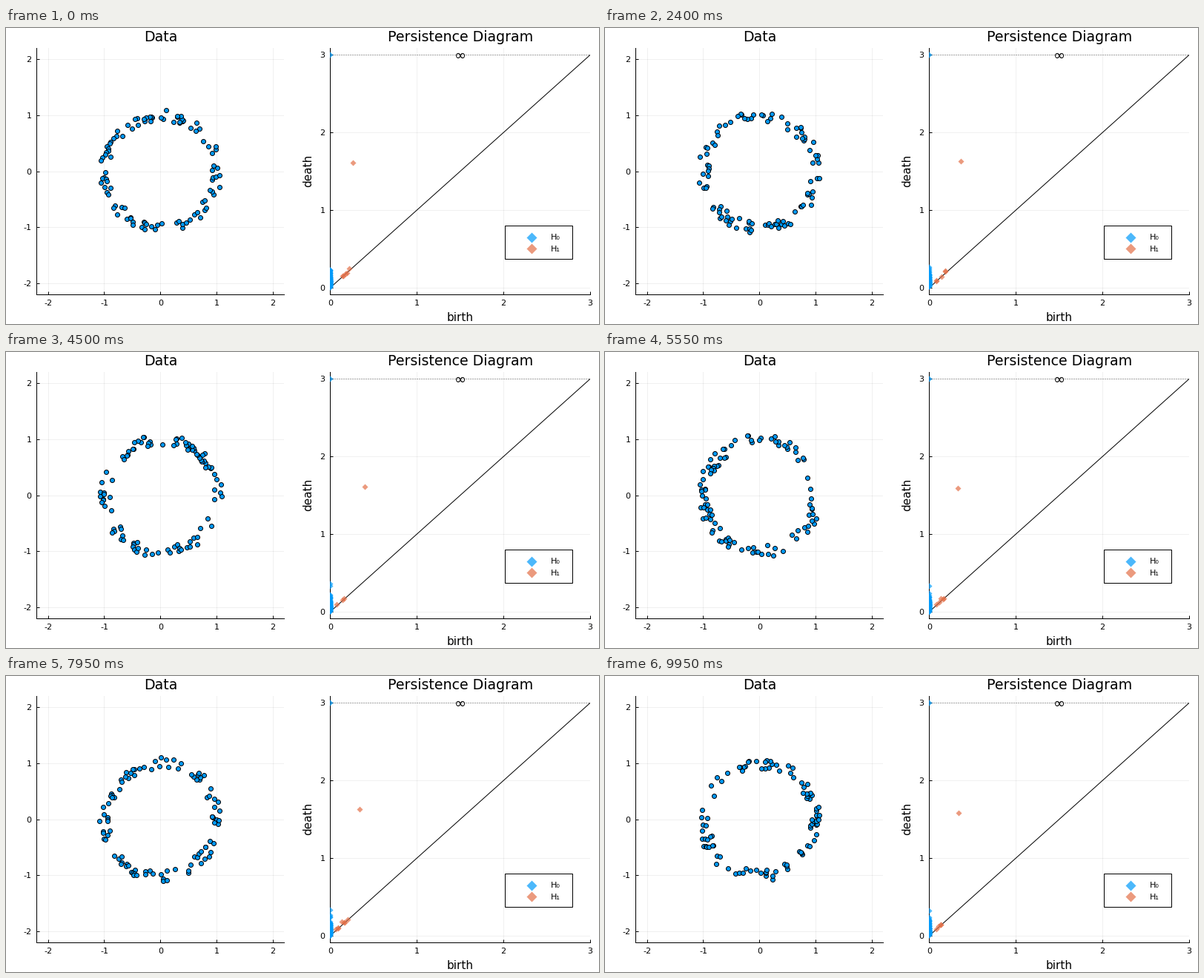
Recreate the animation shown at these times as a matplotlib script. Size 800 by 400 pixels, loop 10 s.

```python
import itertools

import matplotlib.pyplot as plt
import numpy as np
from matplotlib.animation import FuncAnimation
from matplotlib.patches import Rectangle

W, H, DPI = 800, 400, 100
PX = 72 / DPI                      # one pixel in points
FRAMES, INTERVAL = 200, 50
N = 100                            # points per sample
R_MIN, R_MAX = 0.9, 1.1
SMALL = 0.35                       # longest edge considered for minor loops
BLUE, ORANGE = "#009afa", "#e36f47"

plt.rcParams["font.family"] = "DejaVu Sans"

# Index tables shared by every sample
PAIRS = np.array(list(itertools.combinations(range(N), 2)))
PAIR_ID = np.zeros((N, N), int)
PAIR_ID[PAIRS[:, 0], PAIRS[:, 1]] = np.arange(len(PAIRS))
I, J, K = np.array(list(itertools.combinations(range(N), 3))).T
SIDES = np.array([PAIR_ID[I, J], PAIR_ID[I, K], PAIR_ID[J, K]])


def sample(frame):
    """Noisy ring, sorted by angle."""
    rng = np.random.default_rng(1000 + frame)
    theta = np.sort(rng.uniform(0, 2 * np.pi, N))
    radius = rng.uniform(R_MIN, R_MAX, N)
    xy = np.column_stack([radius * np.cos(theta), radius * np.sin(theta)])
    return theta, xy


def merge_components(theta, length, order):
    """Component deaths, and the length at which a cycle first circles the ring."""
    label, turn = np.arange(N), np.zeros(N)
    deaths, birth = [], None
    for e in order:
        i, j = PAIRS[e]
        step = (theta[j] - theta[i] + np.pi) % (2 * np.pi) - np.pi
        gap = turn[i] + step - turn[j]
        if label[i] != label[j]:
            moved = label == label[j]
            turn[moved] += gap
            label[moved] = label[i]
            deaths.append(length[e])
        elif birth is None and abs(gap) > 1:
            birth = length[e]
        if birth is not None and len(deaths) == N - 1:
            break
    return deaths, birth


def minor_loops(ranks, top, sorted_length):
    """Short-lived loops, by reducing the boundary matrix modulo 2."""
    short = np.flatnonzero(top < np.searchsorted(sorted_length, SMALL))
    short = short[np.argsort(top[short], kind="stable")]
    columns, loops = {}, []
    for t in short:
        col = 0
        for r in ranks[:, t]:
            col ^= 1 << int(r)
        while col:
            low = col.bit_length() - 1
            if low not in columns:
                columns[low] = col
                if low != top[t]:
                    loops.append((sorted_length[low], sorted_length[top[t]]))
                break
            col ^= columns[low]
    return loops


def persistence(theta, xy):
    length = np.hypot(*(xy[PAIRS[:, 0]] - xy[PAIRS[:, 1]]).T)
    order = np.argsort(length)
    rank = np.empty(len(order), int)
    rank[order] = np.arange(len(order))
    ranks = rank[SIDES]
    top = ranks.max(axis=0)
    sorted_length = length[order]

    deaths, birth = merge_components(theta, length, order)
    # The ring closes with the first triangle around its centre
    around = ((theta[J] - theta[I] < np.pi) & (theta[K] - theta[J] < np.pi)
              & (theta[K] - theta[I] > np.pi))
    ring = (birth, sorted_length[top[around].min()])
    h0 = np.array([(0, d) for d in deaths] + [(0, 3)])
    h1 = np.array(minor_loops(ranks, top, sorted_length) + [ring])
    return h0, h1


fig = plt.figure(figsize=(W / DPI, H / DPI), dpi=DPI, facecolor="white")


def text(x, y, s, px, **kw):
    kw.setdefault("ha", "center")
    fig.text(x / W, 1 - y / H, s, fontsize=px * PX, va="baseline",
             rotation_mode="anchor", **kw)


def panel(left, right, xlim, ylim, xticks, yticks, title):
    top, bottom = 27, 360.4
    ax = fig.add_axes([left / W, 1 - bottom / H, (right - left) / W, (bottom - top) / H])
    ax.set(xlim=xlim, ylim=ylim, xticks=xticks, yticks=yticks)
    ax.set_axisbelow(True)
    ax.patch.set_visible(False)
    ax.grid(color="black", alpha=0.06, lw=PX)
    ax.tick_params(direction="in", length=4 * PX, width=PX,
                   labelbottom=False, labelleft=False)
    for side in ("left", "bottom"):
        ax.spines[side].set_linewidth(PX)
    for side in ("top", "right"):
        ax.spines[side].set_visible(False)
    for v in xticks:
        x = left + (v - xlim[0]) / (xlim[1] - xlim[0]) * (right - left)
        text(x, 375, str(v), 11.1)
    for v in yticks:
        y = bottom - (v - ylim[0]) / (ylim[1] - ylim[0]) * (bottom - top)
        text(left - 7, y + 4, str(v), 11.1, ha="right")
    text((left + right) / 2, 18, title, 19)
    return ax


def diamonds(ax, color, half, x=(), y=(), **kw):
    return ax.plot(x, y, "D", ms=half * 2 ** 0.5 * PX, mfc=color, mec="none",
                   alpha=0.7, snap=False, **kw)[0]


data_ax = panel(41.4, 375.3, (-2.2, 2.2), (-2.2, 2.2),
                range(-2, 3), range(-2, 3), "Data")
dots, = data_ax.plot([], [], "o", ms=6 * PX, mfc=BLUE, mec="black", mew=PX, snap=False)

diag_ax = panel(437.4, 788, (0, 3), (-0.09, 3.09),
                range(4), range(4), "Persistence Diagram")
diag_ax.plot([0, 3], [0, 3], color="black", lw=PX)
diag_ax.plot([0, 3], [3, 3], color="black", alpha=0.6, lw=PX, ls=(0, (1, 2)))
text(613, 42.5, "∞", 19.4)
text(613, 396, "birth", 15.3)
text(412, 193.2, "death", 15.3, rotation=90)
marks0 = diamonds(diag_ax, BLUE, 4.2, zorder=3)
marks1 = diamonds(diag_ax, ORANGE, 4.2, zorder=4)

# Legend in pixel coordinates
legend = fig.add_axes([0, 0, 1, 1], xlim=(0, W), ylim=(H, 0))
legend.axis("off")
legend.add_patch(Rectangle((673, 267), 91, 45, fc="white", ec="black", lw=PX))
for y, color, name in ((282.5, BLUE, "H₀"), (297.5, ORANGE, "H₁")):
    diamonds(legend, color, 6.5, [709], [y])
    text(735, y + 4, name, 11.1, ha="left")


def update(frame):
    theta, xy = sample(frame)
    h0, h1 = persistence(theta, xy)
    dots.set_data(*xy.T)
    marks0.set_data(*h0.T)
    marks1.set_data(*h1.T)
    return dots, marks0, marks1


anim = FuncAnimation(fig, update, frames=FRAMES, interval=INTERVAL,
                     repeat=True, repeat_delay=0)
plt.show()
```
